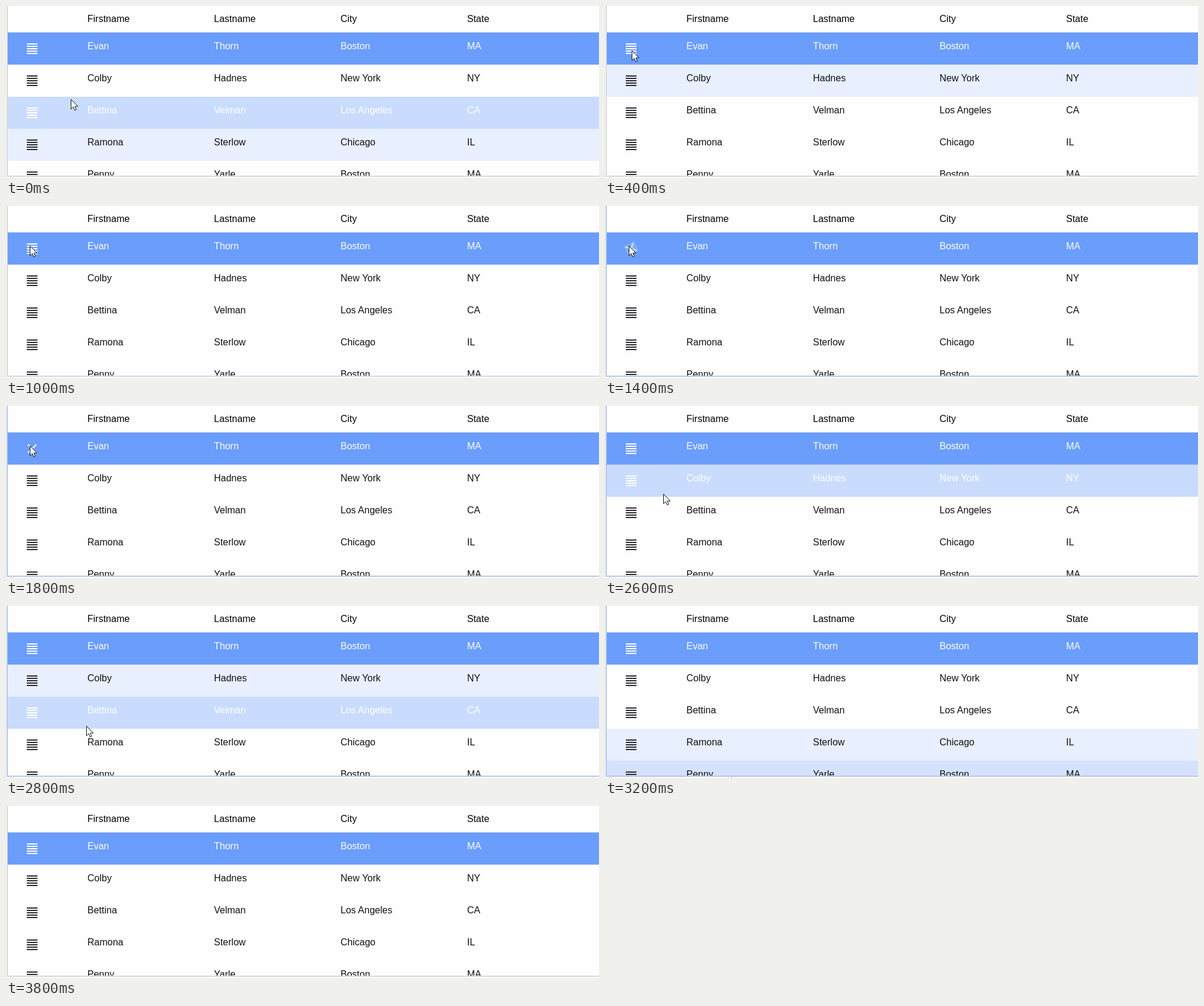
These frames come from a looping animation (998 px wide and 290 px high, 4 s). An HTML page:

```html
<!DOCTYPE html>
<html lang="en">
<head>
<meta charset="utf-8">
<style>
  html, body { margin: 0; width: 100%; height: 100%; overflow: hidden; background: #fefefe; }
  svg { display: block; width: 998px; height: 290px; }
  text { font: 16px "Liberation Sans", Arial, sans-serif; }
</style>
</head>
<body>
<svg id="stage" viewBox="0 0 998 290">
  <defs>
    <clipPath id="table"><rect x="3" width="995" height="286"/></clipPath>
    <path id="bars" d="M35 64h18m-18 4h18m-18 4h18m-18 4h18m-18 4h18" stroke-width="2"/>
  </defs>
  <rect width="998" height="290" fill="#fefefe"/>
  <g id="rows" clip-path="url(#table)"></g>
  <path id="frame" d="M2 0V287H998" fill="none" stroke-width="2"/>
  <path id="cursor" d="M0 0V16.3L3.8 12.7L6.3 18.4L8.8 17.3L6.4 11.7H11.5Z" fill="#fff" stroke="#111" stroke-width="1"/>
</svg>
<script>
const STEP = 200, STEPS = 20, ROW_TOP = 45, ROW_HEIGHT = 54;
const COLUMNS = [137, 350, 563, 776];
const HEADER = ["Firstname", "Lastname", "City", "State"];
const PEOPLE = [
  ["Evan", "Thorn", "Boston", "MA"],
  ["Colby", "Hadnes", "New York", "NY"],
  ["Bettina", "Velman", "Los Angeles", "CA"],
  ["Ramona", "Sterlow", "Chicago", "IL"],
  ["Penny", "Yarle", "Boston", "MA"]
];
// Pointer keys: step, x, y
const PATH = [
  [-1, 145, 215], [0, 109, 157], [1, 72, 110], [2, 45, 75], [3, 40, 67], [11, 40, 67],
  [12, 58, 90], [13, 98, 148], [14, 135, 202], [16, 212, 289], [17, 250, 340], [20, 250, 400]
];
// How far the handle has turned into a cross: step, amount
const TURN = [[5, 0], [6, 0.07], [7, 0.7], [8, 1], [9, 1], [10, 0.6], [11, 0.07], [12, 0]];

const byId = id => document.getElementById(id);

function add(parent, name, attributes, content = "") {
  const node = document.createElementNS("http://www.w3.org/2000/svg", name);
  for (const key in attributes) node.setAttribute(key, attributes[key]);
  node.textContent = content;
  return parent.appendChild(node);
}

function sample(keys, step) {
  if (step <= keys[0][0]) return keys[0].slice(1);
  for (let i = 1; i < keys.length; i++) {
    const [from, ...a] = keys[i - 1], [to, ...b] = keys[i];
    if (step <= to) return a.map((v, k) => v + (b[k] - v) * (step - from) / (to - from));
  }
  return keys[keys.length - 1].slice(1);
}

function addTexts(parent, words, y) {
  words.forEach((word, i) => add(parent, "text", { x: COLUMNS[i], y }, word));
}

const table = byId("rows");
addTexts(table, HEADER, 27);

const rows = PEOPLE.map((person, i) => {
  const group = add(table, "g", { transform: `translate(0 ${i * ROW_HEIGHT})` });
  const back = add(group, "rect", { x: 3, y: ROW_TOP, width: 995, height: ROW_HEIGHT, fill: "#6a9dfc" });
  const glow = i ? null : add(group, "rect", { x: 17, y: 59, width: 981, height: 25, fill: "#689af9" });
  const labels = add(group, "g", {});
  addTexts(labels, person, 73);
  const icon = add(group, "g", { fill: "none" });
  const bars = add(icon, "use", { href: "#bars" });
  const cross = i ? null : add(icon, "path", { d: "M37 65L51 79M51 65L37 79", "stroke-width": 2.2, stroke: "#fff" });
  return { back, glow, labels, icon, bars, cross };
});
add(table, "path", { d: "M3 44.5H998", stroke: "#bccdf0" });
add(table, "path", { d: "M3 98.5H998", stroke: "#8aacee" });

const rowAt = y => Math.floor((y - ROW_TOP) / ROW_HEIGHT);

function render(time) {
  const step = Math.floor(time / STEP) % STEPS;
  const [x, y] = sample(PATH, step);
  const hovered = rowAt(y), left = rowAt(sample(PATH, step - 1)[1]);

  rows.forEach((row, i) => {
    const over = i === hovered;
    const lit = i === 0 || over && y < 286;
    const shade = over ? (y < 286 ? 0.36 : 0.29) : i === left ? 0.15 : 0;
    row.back.setAttribute("fill-opacity", i ? shade : 1);
    row.labels.setAttribute("fill", lit ? "#fff" : "#111");
    row.icon.setAttribute("stroke", lit ? "#fff" : "#2b2b30");
  });

  const first = rows[0], [turn] = sample(TURN, step);
  const pressed = step === 6 || step === 11;
  first.back.setAttribute("fill", pressed ? "#6790e2" : "#6a9dfc");
  first.glow.setAttribute("opacity", pressed ? 1 : 0);
  first.icon.setAttribute("transform", `rotate(${90 * turn} 44 72)`);
  first.bars.setAttribute("opacity", turn < 0.1 ? 1 : 1 - turn);
  first.cross.setAttribute("opacity", turn < 0.1 ? 0 : turn);

  byId("frame").setAttribute("stroke", step >= 6 && step < 18 ? "#b7c4e4" : "#d8d8dc");
  byId("cursor").setAttribute("transform", `translate(${Math.round(x) + 0.5} ${Math.round(y) + 0.5})`);
}

const start = performance.now();
function tick() {
  render(performance.now() - start);
  requestAnimationFrame(tick);
}
render(0);
requestAnimationFrame(tick);
</script>
</body>
</html>
```
